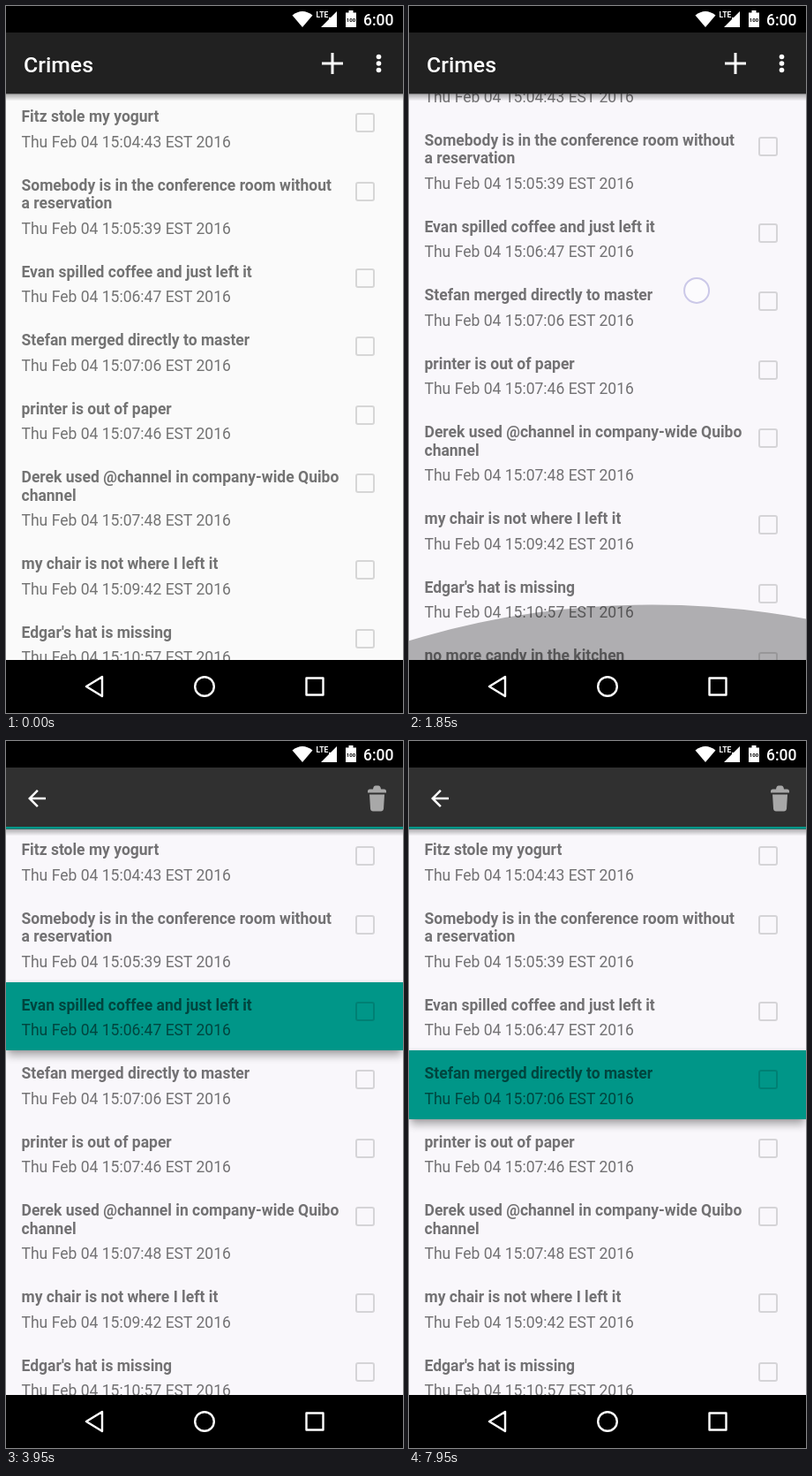
Write an HTML page that moves like this. It is 450 px wide and 800 px high and loops after 8 s.

```html
<!DOCTYPE html>
<html lang="en">
<head>
<meta charset="utf-8">
<title>Crimes</title>
<style>
  html, body { margin: 0; width: 100%; height: 100%; overflow: hidden; background: #000; }
  body { font: 17.5px/20.5px Roboto, "Noto Sans", sans-serif; }
  #stage { position: absolute; left: 0; top: 0; width: 450px; height: 800px; overflow: hidden; }
  #view { position: absolute; left: 0; top: 0; width: 450px; height: 740px; overflow: hidden; }
  #list { position: absolute; left: 0; top: 99px; width: 450px; }
  .row { position: relative; box-sizing: border-box; padding: 16.25px 0 12.25px 17.5px;
         white-space: nowrap; color: rgba(0,0,0,.54); }
  .row b { display: block; font-weight: 700; margin-bottom: 8px; }
  .row span { display: block; font-size: 17.55px; }
  .row i { position: absolute; left: 396px; top: 22px; width: 18px; height: 18px;
           border: 2.5px solid rgba(0,0,0,.14); border-radius: 3px; }
  #overlay { position: absolute; left: 0; top: 0; }
</style>
</head>
<body>
<div id="stage">
  <div id="view"><div id="list"></div></div>
  <svg id="overlay" width="450" height="800" viewBox="0 0 450 800">
    <defs>
      <linearGradient id="shade" x2="0" y2="1">
        <stop offset="0" stop-color="#000" stop-opacity=".32"/>
        <stop offset="1" stop-color="#000" stop-opacity="0"/>
      </linearGradient>
      <clipPath id="body"><rect y="98" width="450" height="642"/></clipPath>
    </defs>
    <g clip-path="url(#body)" fill="#212121">
      <ellipse id="topGlow" rx="675"/>
      <ellipse id="bottomGlow" rx="675"/>
    </g>
    <rect y="99.5" width="450" height="8" fill="url(#shade)"/>

    <rect y="30" width="450" height="69.5" fill="#212121"/>
    <g fill="#fff">
      <text x="20" y="74.5" font-size="24.8" font-weight="500">Crimes</text>
      <path d="M358 63.5h10.5v-10.5h3v10.5h10.5v3h-10.5v10.5h-3v-10.5h-10.5z"/>
      <circle cx="422.5" cy="57.5" r="2.8"/>
      <circle cx="422.5" cy="65" r="2.8"/>
      <circle cx="422.5" cy="72.5" r="2.8"/>
    </g>
    <g id="actionBar">
      <rect y="30" width="450" height="69.5" fill="#303030"/>
      <rect y="97" width="450" height="2.5" fill="#009688"/>
      <path transform="translate(20 50) scale(1.25)" fill="#fff"
        d="M20 11H7.83l5.59-5.59L12 4l-8 8 8 8 1.41-1.41L7.83 13H20z"/>
      <g fill="#a8a8a8">
        <path d="M410 58.5v-1.5q0-2.5 2.5-2.5h3.5q.5-4 3-4h3q2.500 0 3 4h3.500q2.500 0 2.500 2.500v1.500z"/>
        <path d="M412 60.500h17l-1 16q-.3 3-3 3h-9q-2.700 0-3-3z"/>
      </g>
    </g>

    <rect width="450" height="30"/>
    <g fill="#fff">
      <path d="M324.5 10.5q11.500-9 23 0l-11.500 13.500z"/>
      <path d="M357 24l9-9v-2h2l7-7v18z"/>
      <text x="351.5" y="13" font-size="8.500" font-weight="700">LTE</text>
      <path d="M385 7.500h3.500v-2.500h5v2.500h3.500v16.500h-12z"/>
      <text x="405" y="22" font-size="17.5" font-weight="500">6:00</text>
    </g>
    <text x="391" y="18" font-size="6" font-weight="700" text-anchor="middle">100</text>

    <rect y="740" width="450" height="60"/>
    <g fill="none" stroke="#fff" stroke-width="2.4" stroke-linejoin="round">
      <path d="M91 770l18-11v22z"/>
      <circle cx="225" cy="770" r="10.8"/>
      <rect x="340.5" y="760.5" width="19" height="19"/>
    </g>
    <circle id="touch" fill="#fff" fill-opacity=".5" stroke="#cbc8e8" stroke-width="2"/>
  </svg>
</div>
<script>
const LOOP = 8000, STEP = 50, FADE = 250;
const DRAG = 1250, TURN = 1765, BACK = 2125;
const START_Y = 602, TURN_Y = 275, BACK_Y = 632, SLOP = 10;
const END_SCROLL = 98, REST_SCROLL = 2, LIST_HEIGHT = 640;

const crimes = [
  ["Fitz stole my yogurt", "04:43"],
  ["Somebody is in the conference room without<br>a reservation", "05:39"],
  ["Evan spilled coffee and just left it", "06:47"],
  ["Stefan merged directly to master", "07:06"],
  ["printer is out of paper", "07:46"],
  ["Derek used @channel in company-wide Quibo<br>channel", "07:48"],
  ["my chair is not where I left it", "09:42"],
  ["Edgar's hat is missing", "10:57"],
  ["no more candy in the kitchen", "11:31"]
];

const touches = [
  { down: DRAG, up: 2150, at: finger },
  { down: 2750, up: 3700, at: () => [267.5, 311] },
  { down: 6600, up: 6600, at: () => [270, 233.5] },
  { down: 7250, up: 7250, at: () => [270, 314] },
  { down: 7650, up: 7700, at: () => [270, 392] }
];

// Selected row from each time on.
const selections = [[3300, 2], [6650, 1], [7300, 2], [7750, 3]];

const $ = id => document.getElementById(id);
const clamp = (v, lo = 0, hi = 1) => Math.min(hi, Math.max(lo, v));
const ramp = (t, start, length) => clamp((t - start) / length);
const ease = k => (1 - Math.cos(Math.PI * k)) / 2;
const mix = (a, b, k) => a + (b - a) * k;
const setAll = (node, attrs) => {
  for (const name in attrs) node.setAttribute(name, attrs[name]);
};

$("list").innerHTML = crimes.map(([title, time]) =>
  `<div class="row"><b>${title}</b><span>Thu Feb 04 15:${time} EST 2016</span><i></i></div>`).join("");
const rows = [...document.querySelectorAll(".row")];

// One drag: up past the end of the list, then down past its start.
function finger(t) {
  const up = ease(ramp(t, DRAG, TURN - DRAG));
  const down = ease(ramp(t, TURN, BACK - TURN));
  return [
    mix(mix(284, 330, up), 300, down),
    mix(mix(START_Y, TURN_Y, up), BACK_Y, down)
  ];
}

function scrollAt(t) {
  const y = finger(t)[1];
  if (t < TURN) return clamp(START_Y - SLOP - y, 0, END_SCROLL);
  return clamp(END_SCROLL - (y - TURN_Y), 0, END_SCROLL) + REST_SCROLL * ramp(t, BACK, STEP);
}

function drawTouch(t) {
  const touch = touches.find(g => t >= g.down && t < g.up + FADE);
  $("touch").style.display = touch ? "" : "none";
  if (!touch) return;
  const [cx, cy] = touch.at(t);
  const gone = ramp(t, touch.up, FADE);
  setAll($("touch"), { cx, cy, r: 14 + 4 * gone, opacity: 1 - gone });
}

// Overscroll glow: follows the pulled distance, then recedes after the release.
function drawGlow(node, t, distance, release, edge, side) {
  const pull = Math.max(0, distance) / LIST_HEIGHT;
  const left = (1 - ramp(t, release, 600)) ** 2;
  const size = pull ? Math.max(0, 0.7 - 1 / Math.sqrt(288 * pull)) / 0.7 * left : 0;
  setAll(node, {
    cx: 225 + (finger(t)[0] - 225) / 2,
    cy: edge + side * (90 - 675) * size,
    ry: 675 * size,
    opacity: Math.min(0.42, 1.25 * pull) * left
  });
}

function drawGlows(t) {
  const endY = START_Y - SLOP - END_SCROLL, startY = TURN_Y + END_SCROLL;
  drawGlow($("bottomGlow"), t, endY - finger(Math.min(t, TURN))[1], TURN + 25, 740, -1);
  drawGlow($("topGlow"), t, t > TURN ? finger(t)[1] - startY : 0, BACK, 98, 1);
}

function drawRipple(row, t) {
  const k = ramp(t, 2880, 420);
  const radius = 240 * (1 - 400 ** (-1.4 * k));
  const x = mix(268, 225, k);
  const base = 0.06 * k;
  row.style.background = `radial-gradient(circle at ${x}px 38px,
    rgba(0,0,0,${base + 0.06}) ${radius}px, rgba(0,0,0,${base}) ${radius + 1}px)`;
}

function drawRows(t) {
  const n = selections.filter(s => s[0] <= t).length - 1;
  const [since, current] = selections[n] || [];
  const previous = n > 0 ? selections[n - 1][1] : -1;
  const lift = ramp(t, since - STEP, 150);
  rows.forEach((row, i) => {
    const rise = i === current ? lift : i === previous ? 1 - lift : 0;
    row.style.background = i === current ? "#009688" : rise ? $("view").style.background : "none";
    row.style.zIndex = i === current ? 2 : rise ? 1 : 0;
    row.style.boxShadow = rise
      ? `0 ${8 * rise}px 9px -2px rgba(0,0,0,${0.32 * rise}), 0 0 4px rgba(0,0,0,${0.14 * rise})`
      : "none";
  });
  if (t >= 2900 && t < selections[0][0]) drawRipple(rows[2], t);
}

function render(t) {
  $("view").style.background = t < 1450 ? "#fafafa" : "#f9f7fb";
  $("list").style.transform = `translateY(${-scrollAt(t)}px)`;
  drawRows(t);
  drawGlows(t);
  $("actionBar").setAttribute("opacity", ramp(t, 3300, 300));
  drawTouch(t);
}

const begin = performance.now();
function tick() {
  const t = (performance.now() - begin) % LOOP;
  render(Math.floor(t / STEP) * STEP);
  requestAnimationFrame(tick);
}
tick();
</script>
</body>
</html>
```
